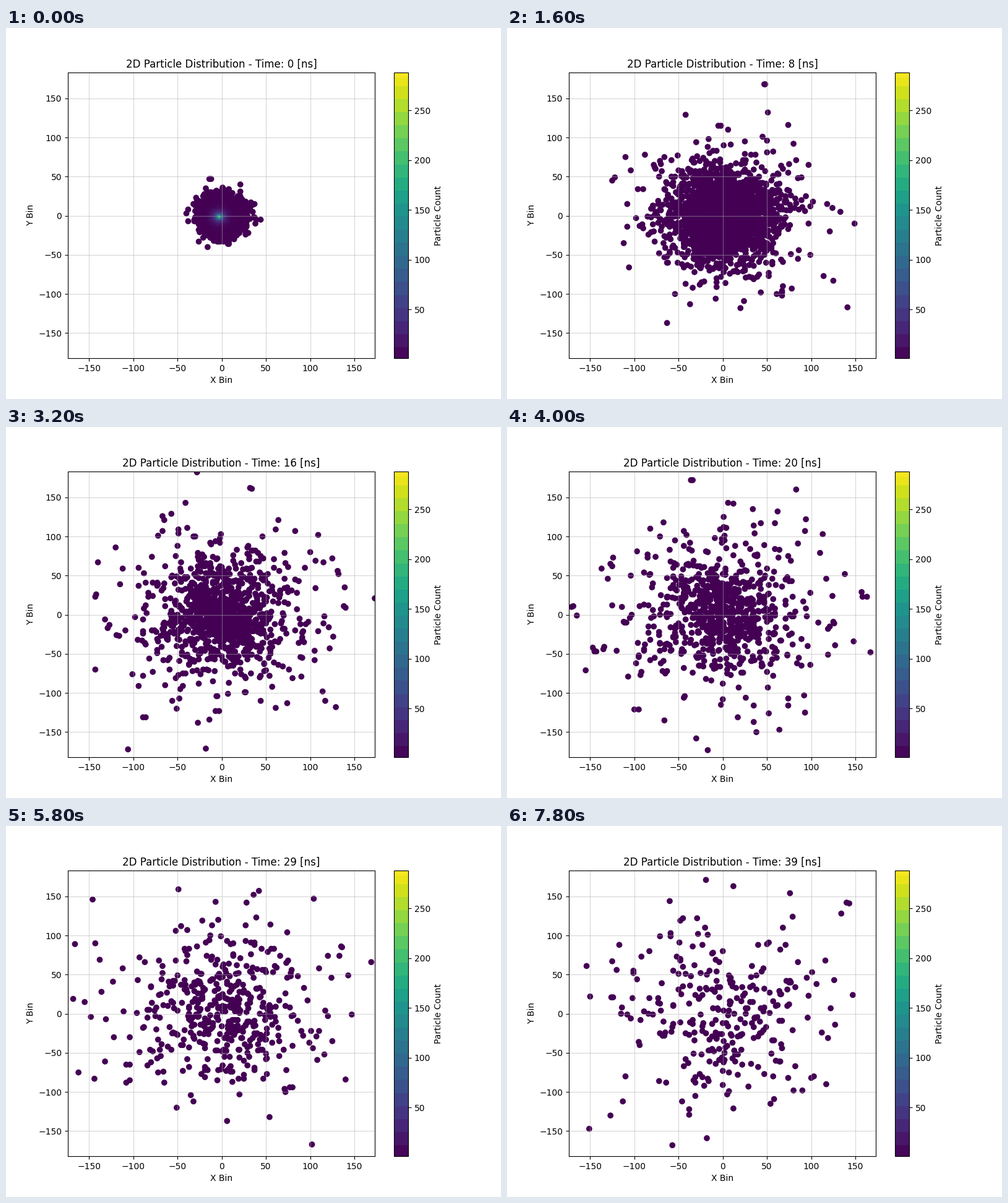
Animation, 800 px wide and 600 px high, one loop 8000 ms. Source, as a matplotlib script:

```python
import numpy as np
import matplotlib.pyplot as plt
from matplotlib.animation import FuncAnimation
from matplotlib.cm import ScalarMappable
from matplotlib.colors import ListedColormap, Normalize

FRAMES = 40
INTERVAL = 200
X_LIM = (-174, 173)
Y_LIM = (-182, 183)


def hits(t):
    """Random hits at time t: the cloud spreads, flattens and thins out."""
    rng = np.random.default_rng(700 + t)
    count = int(20000 / (1 + t / 5) ** 2 + 50)
    spread = 4.2 + 28 * (1 - np.exp(-t / 13))
    shape = 1.8 + 0.02 * t

    r = rng.gamma(shape, spread, count)
    phi = rng.uniform(0, 2 * np.pi, count)
    pts = np.column_stack([r * np.cos(phi), r * np.sin(phi)])

    # Some hits come in close pairs
    pairs = count // 12
    pts[:pairs] = pts[pairs:2 * pairs] + rng.normal(0, 2.5, (pairs, 2))
    return pts


def binned(t):
    """Occupied bins, ordered by x then y, with their counts."""
    cells = np.rint(hits(t)).astype(int)
    x, y = cells.T
    inside = (x >= X_LIM[0]) & (x <= X_LIM[1]) & (y >= Y_LIM[0]) & (y <= Y_LIM[1])
    return np.unique(cells[inside], axis=0, return_counts=True)


def banded(rows=462):
    """Viridis in flat steps for the colour bar."""
    edges = np.r_[0, np.linspace(18, 440, 21), 454, rows]
    mids = (edges[:-1] + edges[1:]) / 2 / rows
    band = np.searchsorted(edges, np.arange(rows) + 0.5) - 1
    return ListedColormap(plt.cm.viridis(mids[band]))


fig, ax = plt.subplots(figsize=(8, 6), dpi=100)
norm = Normalize(1, 288)
dots = ax.scatter([], [], c=[], cmap="viridis", norm=norm)
bar = fig.colorbar(ScalarMappable(norm, banded()), ax=ax)
bar.set_label("Particle Count")
ax.set_xlim(*X_LIM)
ax.set_ylim(*Y_LIM)
ax.set_xlabel("X Bin")
ax.set_ylabel("Y Bin")
ax.grid(True, alpha=0.5)
title = ax.set_title("")


def update(t):
    cells, counts = binned(t)
    dots.set_offsets(cells)
    dots.set_array(counts)
    title.set_text(f"2D Particle Distribution - Time: {t} [ns]")
    return dots, title


anim = FuncAnimation(fig, update, frames=FRAMES, interval=INTERVAL,
                     init_func=lambda: update(0), repeat=True, repeat_delay=0)
plt.show()
```
